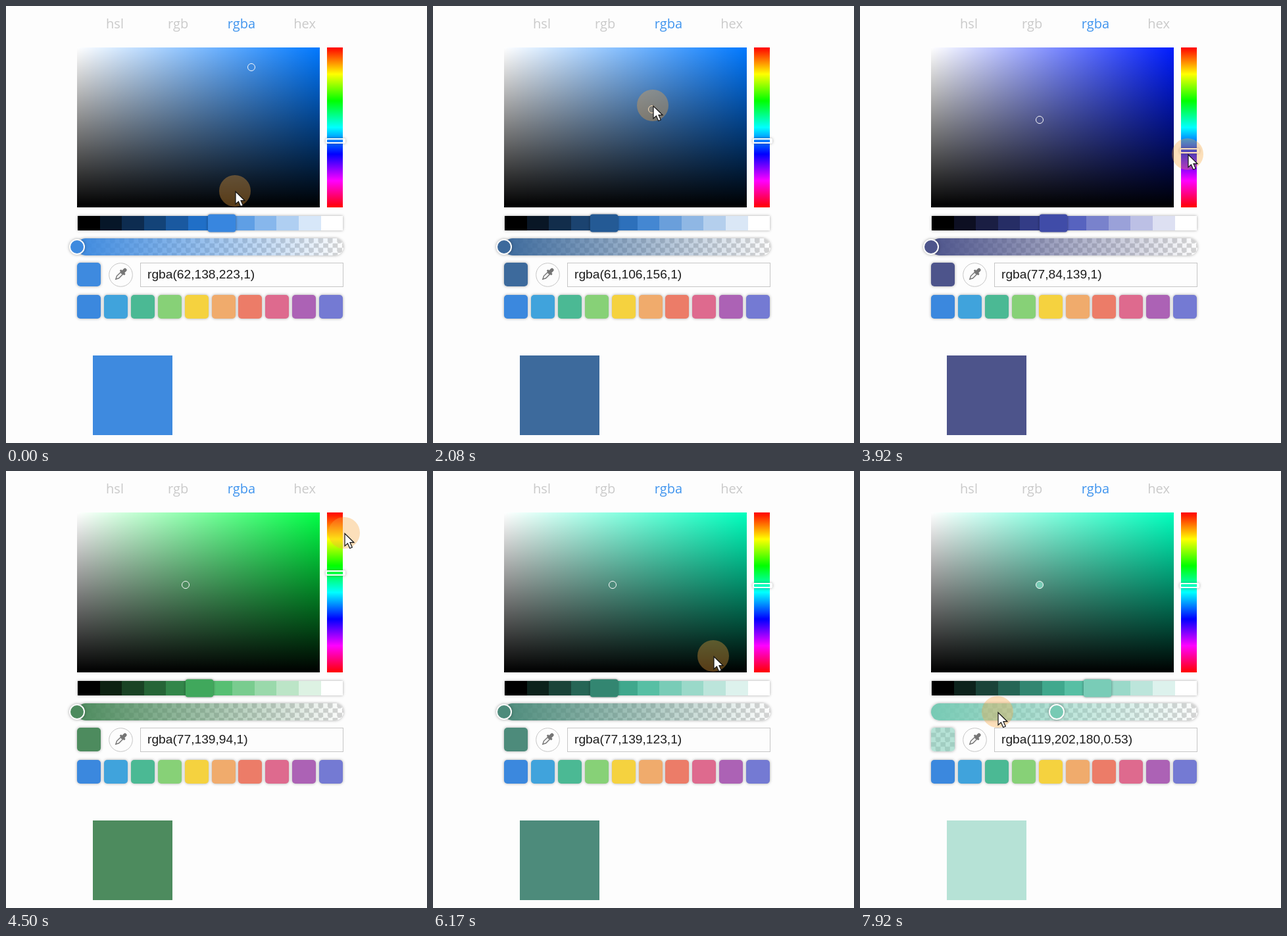
Recreate the animation shown at these times as an HTML page. Size 640 by 664 pixels, loop 8000 ms.

```html
<!DOCTYPE html>
<html lang="en">
<head>
<meta charset="utf-8">
<title>Colour picker</title>
<style>
html, body { margin: 0; width: 100%; height: 100%; overflow: hidden; background: #fdfdfd; }
#stage { position: relative; width: 640px; height: 664px; overflow: hidden; --glow: 0 0 4px rgba(0, 0, 0, .34); }
#stage div, #stage svg { position: absolute; box-sizing: border-box; }
.tab { top: 12px; width: 96px; font: 20px/30px "Open Sans", "Noto Sans", sans-serif; text-align: center; color: #cacaca; }
.tab.active { color: #3f94ee; }
#panel { left: 108px; top: 63px; width: 369px; height: 243px; }
#marker { width: 12px; height: 12px; margin: -6px; border: 1.5px solid #fafafa; border-radius: 50%; }
#hue {
  left: 488px; top: 63px; width: 24px; height: 243px;
  background: linear-gradient(red, yellow, lime, cyan, blue, magenta, red);
}
#thumb {
  left: 486px; width: 30px; height: 8px; margin-top: -4px;
  border: 2px solid #fdfdfd; border-radius: 3px; box-shadow: var(--glow);
}
#strip { left: 109px; top: 319px; width: 403px; height: 22px; box-shadow: var(--glow); }
#strip div { top: 0; height: 22px; width: 33.7px; }
#strip .on { transform: scale(1.25, 1.22); border-radius: 3px; z-index: 1; box-shadow: 0 0 3px rgba(0, 0, 0, .45); }
.checks { background: repeating-conic-gradient(#d4d4d4 0 25%, #fdfdfd 0 50%) 0 0 / 14.4px 14.4px; overflow: hidden; }
.checks div { inset: 0; }
#alpha { left: 108px; top: 353px; width: 405px; height: 26px; border-radius: 13px; box-shadow: var(--glow); }
#knob {
  top: 354px; width: 24px; height: 24px; margin-left: -12px;
  border: 2.5px solid #fdfdfd; border-radius: 50%; box-shadow: var(--glow);
}
.swatch { width: 36px; height: 36px; border-radius: 5px; box-shadow: var(--glow); }
#current { left: 108px; top: 390px; }
#dropper { left: 156px; top: 390px; }
#value {
  left: 204px; top: 390px; width: 309px; height: 37px; padding-left: 10px; border: 1px solid #c6c6c6;
  font: 19.2px/34px "Liberation Sans", Arial, sans-serif; color: #1c1c1c; white-space: pre;
}
#preview { left: 132px; top: 531px; width: 121px; height: 121px; }
#halo { width: 48px; height: 48px; margin: -24px; border-radius: 50%; background: rgba(250, 165, 60, .35); }
#arrow { width: 18px; height: 26px; overflow: visible; }
</style>
</head>
<body>
<div id="stage">
  <div id="panel"></div>
  <div id="marker"></div>
  <div id="hue"></div>
  <div id="thumb"></div>
  <div id="strip"></div>
  <div id="alpha" class="checks"><div id="fade"></div></div>
  <div id="knob"></div>
  <div id="current" class="swatch checks"><div id="tone"></div></div>
  <svg id="dropper" width="37" height="37">
    <circle cx="18.5" cy="18.5" r="17.8" fill="none" stroke="#c6c6c6"/>
    <g transform="translate(18.5 17.5) rotate(45) scale(.9)" fill="#757575">
      <path d="M-3-5V-10a3 3 0 0 1 6 0V-5z"/>
      <rect x="-5.5" y="-6" width="11" height="3.5" rx="1"/>
      <path d="M-2.5-2V7L0 12 2.5 7V-2z" fill="none" stroke="#757575" stroke-width="1.6"/>
    </g>
  </svg>
  <div id="value"></div>
  <div id="preview"></div>
  <div id="halo"></div>
  <svg id="arrow" viewBox="0 0 18 26">
    <path d="M0 0V19L4.4 15 7.7 22.5 11.3 21 8 13.7H14z" fill="#fff" stroke="#151515" stroke-width="1.2"/>
  </svg>
</div>
<script>
const TICK = 1000 / 12, TICKS = 96;
const PANEL = { x: 108, y: 63, w: 368, h: 242 };
const TRACK = 404;
const SHADES = 12;

// Pointer path: tick, x, y
const PATH = [
  [0, 348, 281], [4, 430, 190], [8, 522, 56], [10, 533, 66], [11, 497, 85], [14, 453, 119],
  [16, 392, 98], [18, 373, 93.4], [21, 350, 125], [24, 332.5, 157], [25, 334, 151], [28, 300, 178],
  [32, 262, 140], [35, 273.3, 173], [40, 478, 202], [42, 499, 205.3], [44, 499, 205.3],
  [46, 498, 219.8], [47, 498, 225], [50, 505, 270], [52, 510, 215], [55, 516, 34], [57, 512, 130],
  [58, 508, 176.8], [59, 508, 176], [61, 507, 173.65], [63, 512, 150], [66, 533, 46],
  [70, 533, 84], [74, 426, 281], [77, 300, 322], [80, 198, 327], [82, 360, 329],
  [84, 360, 329], [88, 200, 360], [90, 108, 366], [91, 122, 366], [92, 220, 366],
  [93, 335, 366], [94, 299, 366], [95, 209, 366]
];
const DRAG = { field: [18, 35], hue: [42, 61], alpha: [90, 96] };
const SHADE_CLICK = 83;
const LAG = 1;

const $ = id => document.getElementById(id);
const clamp = (v, lo, hi) => Math.min(hi, Math.max(lo, v));

function pointer(tick) {
  const i = PATH.findIndex(p => p[0] >= tick);
  if (i <= 0) return PATH[i ? PATH.length - 1 : 0].slice(1);
  const [t0, x0, y0] = PATH[i - 1], [t1, x1, y1] = PATH[i];
  const k = (tick - t0) / (t1 - t0);
  return [x0 + (x1 - x0) * k, y0 + (y1 - y0) * k];
}

// A dragged handle trails the pointer and rests outside its drag span
const dragged = (tick, [start, end]) => pointer(clamp(tick - LAG, start, end));

// RGB from a hue and the lowest and highest channel (0..1)
const spread = (h, lo, hi) => [5, 3, 1].map(n => {
  const k = (n + h / 60) % 6;
  return Math.round(255 * (hi - (hi - lo) * clamp(Math.min(k, 4 - k), 0, 1)));
});

function hsl(h, s, l) {
  const c = s * Math.min(l, 1 - l);
  return spread(h, l - c, l + c);
}

const css = (rgb, a = 1) => `rgba(${rgb.join()},${a})`;
const distance = (p, q) => Math.hypot(...p.map((v, i) => v - q[i]));

function add(parent, className, style, text = "") {
  const el = document.createElement("div");
  el.className = className;
  el.textContent = text;
  Object.assign(el.style, style);
  return parent.insertBefore(el, parent === stage ? $("halo") : null);
}

const stage = $("stage");
["hsl", "rgb", "rgba", "hex"].forEach((name, i) =>
  add(stage, name === "rgba" ? "tab active" : "tab", { left: 117.5 + 96.2 * i + "px" }, name));
["#3b88de", "#40a3dc", "#4bb994", "#87d177", "#f5d23f", "#f0ab6c", "#ec7c68", "#de6a8e", "#ac62b5", "#747ad3"].forEach((color, i) =>
  add(stage, "swatch", { left: 108 + 40.9 * i + "px", top: "438.5px", background: color }));
const cells = Array.from({ length: SHADES }, (_, i) => add($("strip"), "", { left: 33.6 * i + "px" }));

function place(id, x, y) {
  if (x !== null) $(id).style.left = x + "px";
  if (y !== null) $(id).style.top = y + "px";
}

function draw(tick) {
  const [mx, my] = dragged(tick, DRAG.field);
  const hueY = clamp(dragged(tick, DRAG.hue)[1], PANEL.y, PANEL.y + PANEL.h);
  const knobX = clamp(dragged(tick, DRAG.alpha)[0], PANEL.x, PANEL.x + TRACK);
  const h = (hueY - PANEL.y) / PANEL.h * 360;
  const s = (mx - PANEL.x) / PANEL.w;
  const v = 1 - (my - PANEL.y) / PANEL.h;
  const a = Math.round(100 * (1 - (knobX - PANEL.x) / TRACK)) / 100;

  const shades = cells.map((_, i) => hsl(h, s, i / (SHADES - 1)));
  let color = spread(h, v * (1 - s), v);
  if (tick >= SHADE_CLICK) color = hsl(Math.floor(h), Math.floor(s * 100) / 100, .63);
  const gaps = shades.map(shade => distance(shade, color));
  const nearest = gaps.indexOf(Math.min(...gaps));
  cells.forEach((cell, i) => {
    cell.style.background = css(shades[i]);
    cell.className = i === nearest ? "on" : "";
  });

  $("panel").style.background =
    `linear-gradient(transparent, #000), linear-gradient(to right, #fff, hsl(${h} 100% 50%))`;
  $("marker").style.background = $("knob").style.background = css(color);
  $("fade").style.background = `linear-gradient(to right, ${css(color)}, ${css(color, 0)})`;
  $("tone").style.background = $("preview").style.background = css(color, a);
  $("value").textContent = `rgba(${color.join()},${a})`;

  const [x, y] = pointer(tick);
  place("marker", mx, my);
  place("thumb", null, hueY);
  place("knob", knobX, null);
  place("halo", x, y);
  place("arrow", x + 1, y + 1);
}

let shown = -1;
function loop(now) {
  const tick = Math.floor((now + 4) / TICK) % TICKS;
  if (tick !== shown) draw(shown = tick);
  requestAnimationFrame(loop);
}
draw(0);
requestAnimationFrame(loop);
</script>
</body>
</html>
```
